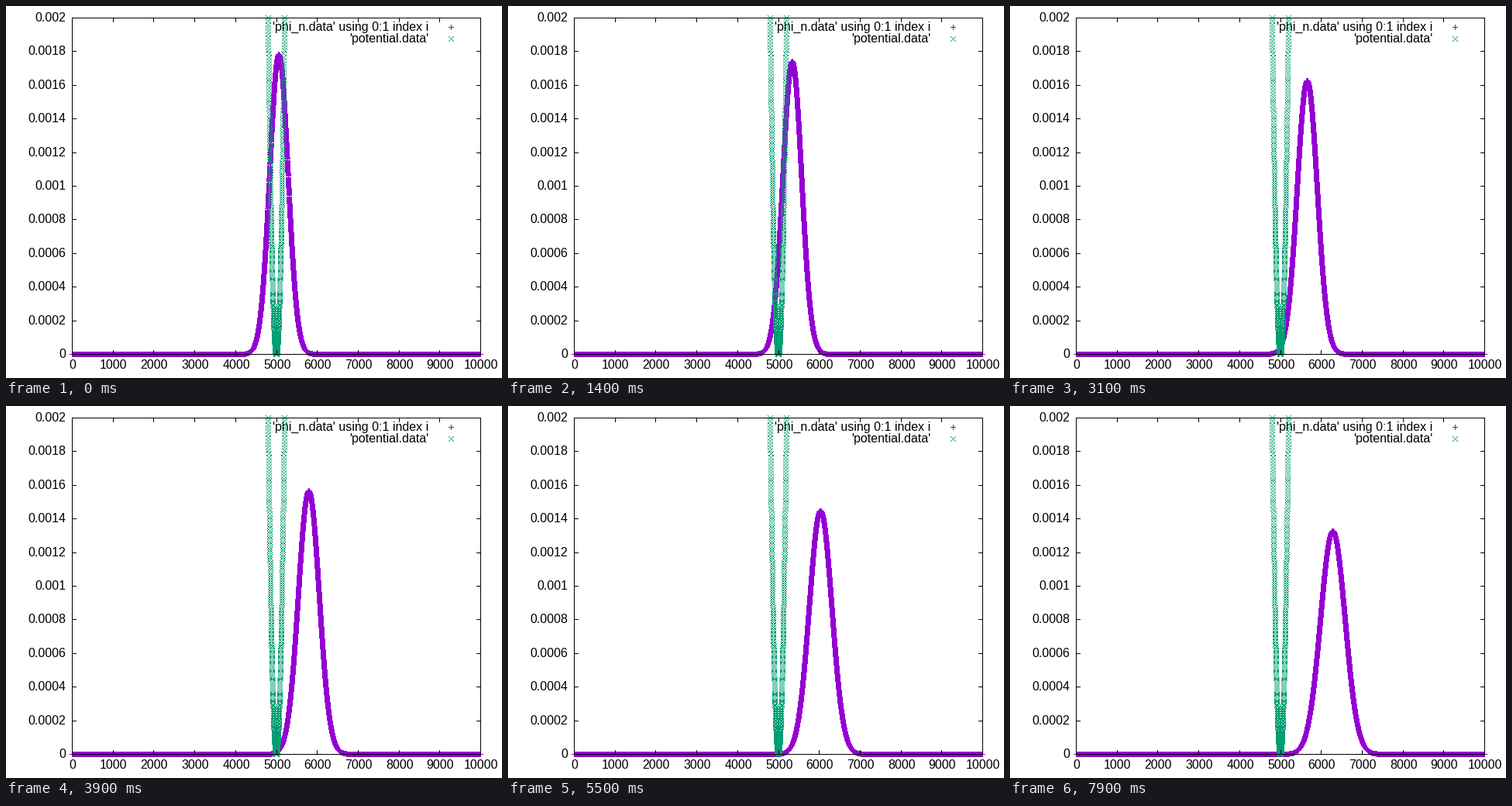
Animation of 640x480 px, one loop 8000 ms. Source, as a matplotlib script:

```python
import numpy as np
import matplotlib.pyplot as plt
from matplotlib.animation import FuncAnimation

W, H, DPI = 640, 480, 80
FRAMES, INTERVAL = 80, 100
LEFT, RIGHT, TOP, BOTTOM = 85, 612, 15, 449
X_MAX, Y_MAX = 10000, 0.002
TIC, ARM = 5, 3
OMEGA = 0.0146  # phase per frame

PURPLE = (0x94, 0x00, 0xD3, 255)
GREEN = (0x00, 0x9E, 0x73, 255)
BLACK = (0, 0, 0, 255)

arm = np.arange(-ARM, ARM + 1)
PLUS = [(d, 0) for d in arm] + [(0, d) for d in arm]
CROSS = [(d, d) for d in arm] + [(d, -d) for d in arm]

plt.rcParams.update({
    "font.family": "Liberation Sans",
    "font.size": 16 * 72 / DPI,
    "text.hinting": "force_autohint",
    "text.hinting_factor": 8,
})


def col(x):
    return np.floor(LEFT + np.asarray(x) * (RIGHT - LEFT) / X_MAX + 0.5).astype(int)


def row(y):
    return BOTTOM - np.floor(np.asarray(y) * (BOTTOM - TOP) / Y_MAX + 0.5).astype(int)


def stamp(img, cols, rows, marker, color):
    """Put a one-pixel-wide marker on every given pixel."""
    for dx, dy in marker:
        img[rows + dy, cols + dx] = color


def draw_frame(img):
    """Border with mirrored inward tics."""
    img[[TOP, BOTTOM], LEFT:RIGHT + 1] = BLACK
    img[TOP:BOTTOM + 1, [LEFT, RIGHT]] = BLACK
    for c in col(x_tics):
        img[TOP:TOP + TIC + 1, c] = BLACK
        img[BOTTOM - TIC:BOTTOM + 1, c] = BLACK
    for r in row(y_tics):
        img[r, LEFT:LEFT + TIC + 1] = BLACK
        img[r, RIGHT - TIC:RIGHT + 1] = BLACK


def density(i):
    """Gaussian packet swinging and breathing in a harmonic well."""
    mean = 5000 + 1378 * np.sin(OMEGA * (i + 3))
    var = 50050 + 47100 * np.sin(OMEGA * (i + 2)) ** 2
    return np.exp(-(x - mean) ** 2 / (2 * var)) / np.sqrt(2 * np.pi * var)


x = np.arange(X_MAX + 1)
x_tics = np.arange(0, X_MAX + 1, 1000)
y_tics = np.arange(11) * 0.0002
x_cols = col(x)

well = 5e-8 * (x - 5000.0) ** 2
inside = well <= Y_MAX + 1e-12
well_cols, well_rows = x_cols[inside], row(well[inside])

fig = plt.figure(figsize=(W / DPI, H / DPI), dpi=DPI, facecolor="white")
ax = fig.add_axes([0, 0, 1, 1])
ax.axis("off")


def label(px, py, text, ha):
    ax.text(px, py + 4.5, text, ha=ha, va="baseline", color="black", zorder=1)


def render(i):
    img = np.zeros((H, W, 4), np.uint8)
    stamp(img, x_cols, row(density(i)), PLUS, PURPLE)
    stamp(img, 574, 27, PLUS, PURPLE)
    stamp(img, well_cols, well_rows, CROSS, GREEN)
    stamp(img, 574, 42, CROSS, GREEN)
    draw_frame(img)
    return img


for v, c in zip(x_tics, col(x_tics)):
    label(c + 0.5, 463, f"{v}", "center")
for v, r in zip(y_tics, row(y_tics)):
    label(76.5, r, f"{v:.4g}", "right")
label(545, 27, "'phi_n.data' using 0:1 index i", "right")
label(545, 42, "'potential.data'", "right")

plot = ax.imshow(render(0), extent=(-0.5, W - 0.5, H - 0.5, -0.5),
                 interpolation="nearest", aspect="auto", zorder=2)


def update(i):
    plot.set_data(render(i))
    return [plot]


anim = FuncAnimation(fig, update, frames=FRAMES, interval=INTERVAL,
                     repeat=True, repeat_delay=0, blit=False)
plt.show()
```
